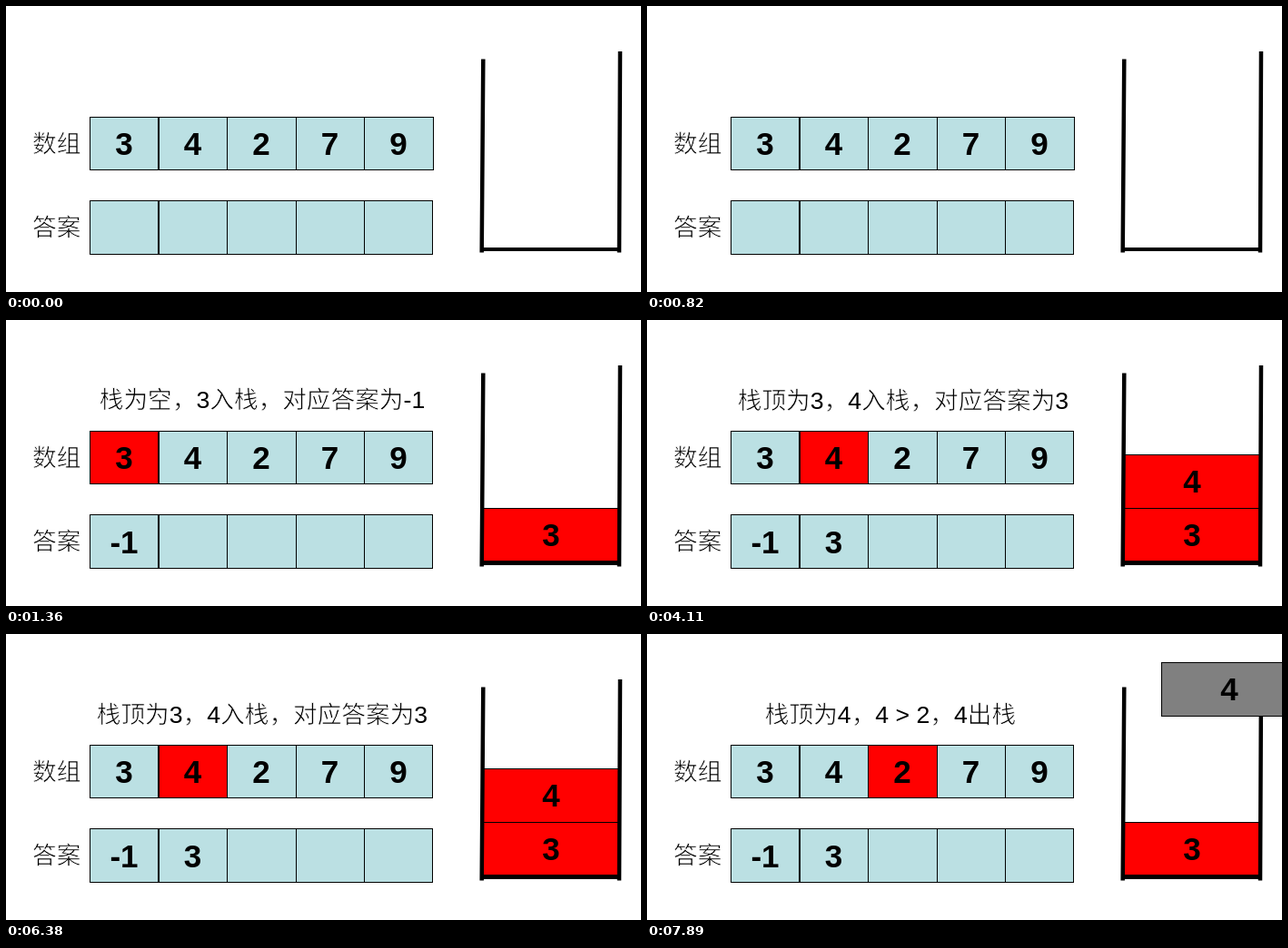
Animation of 699 by 315 pixels, one loop 8000 ms. Source, as an HTML page:

```html
<!DOCTYPE html>
<html lang="zh-CN">
<head>
<meta charset="utf-8">
<title>单调栈</title>
<style>
  html, body { margin: 0; width: 100%; height: 100%; overflow: hidden; background: #fff; }
  svg { display: block; width: 699px; height: 315px; }
  text { text-anchor: middle; font: bold 35px "Liberation Sans", Arial, sans-serif; }
  /* The white outline thins the strokes of the characters */
  .cjk { font: 300 26.67px "Liberation Sans", "Noto Sans CJK SC", "Noto Sans CJK", sans-serif; stroke: #fff; stroke-width: .7; }
  .cjk tspan { stroke: none; }
  .cell { fill: #bbe0e3; stroke: #000; }
  .hot { fill: #f00; stroke: #000; }
  .popped { fill: #808080; stroke: #000; }
  .wall { fill: none; stroke: #000; stroke-width: 4.5; }
  .floor { stroke: #000; stroke-width: 4; }
  .start, .push3, .push4, .pop4, .after3, .after4 { animation: 8s step-end infinite; }
  .start { animation-name: start; }
  .push3 { animation-name: push3; }
  .push4 { animation-name: push4; }
  .pop4 { animation-name: pop4; }
  .after3 { animation-name: after3; }
  .after4 { animation-name: after4; }
  /* Cuts at 1360, 4110 and 7890 ms */
  @keyframes start { 0% { opacity: 1 } 17%, 100% { opacity: 0 } }
  @keyframes push3 { 0% { opacity: 0 } 17% { opacity: 1 } 51.375%, 100% { opacity: 0 } }
  @keyframes push4 { 0% { opacity: 0 } 51.375% { opacity: 1 } 98.625%, 100% { opacity: 0 } }
  @keyframes pop4 { 0% { opacity: 0 } 98.625%, 100% { opacity: 1 } }
  @keyframes after3 { 0% { opacity: 0 } 17%, 100% { opacity: 1 } }
  @keyframes after4 { 0% { opacity: 0 } 51.375%, 100% { opacity: 1 } }
</style>
</head>
<body>
<svg viewBox="0 0 699 315">
  <defs>
    <path id="lines" d="M167.5 0V59M168.5 0V59M243.5 0V59M319.5 0V59M394.5 0V59" stroke="#000"/>
  </defs>

  <text class="cjk" x="55.7" y="161">数组</text>
  <text class="cjk" x="55.7" y="253">答案</text>
  <rect class="cell" x="92.5" y="122.5" width="377" height="58"/>
  <use href="#lines" y="122"/>
  <rect class="cell" x="92.5" y="214.5" width="377" height="59"/>
  <use href="#lines" y="214.5"/>

  <rect class="cell start" x="394.5" y="122.5" width="76" height="58"/>
  <rect class="hot push3" x="92.5" y="122.5" width="75" height="58"/>
  <rect class="hot push4" x="168.5" y="122.5" width="75" height="58"/>
  <rect class="hot pop4" x="243.5" y="122.5" width="76" height="58"/>

  <text x="130" y="163.5">3</text>
  <text x="205.5" y="163.5">4</text>
  <text x="281" y="163.5">2</text>
  <text x="356.5" y="163.5">7</text>
  <text x="432" y="163.5">9</text>
  <text class="after3" x="130" y="256.5">-1</text>
  <text class="after4" x="205.5" y="256.5">3</text>

  <text class="cjk push3" x="282" y="96.5">栈为空，<tspan>3</tspan>入栈，对应答案为<tspan>-1</tspan></text>
  <text class="cjk push4" x="282" y="97.5">栈顶为<tspan>3</tspan>，<tspan>4</tspan>入栈，对应答案为<tspan>3</tspan></text>
  <text class="cjk pop4" x="268" y="97.5">栈顶为<tspan>4</tspan>，<tspan>4 &gt; 2</tspan>，<tspan>4</tspan>出栈</text>

  <g class="push4">
    <rect class="hot" x="525.5" y="148.5" width="149" height="59"/>
    <text x="600" y="190">4</text>
  </g>
  <g class="after3">
    <rect class="hot" x="525.5" y="207.5" width="148" height="58"/>
    <text x="600" y="248.5">3</text>
  </g>
  <path class="wall" d="M525.3 58.5L523.7 271.5M676 50L675 271.5"/>
  <path class="floor" d="M523 268H676"/>
  <g class="pop4">
    <rect class="popped" x="566.5" y="31.5" width="149" height="59"/>
    <text x="641" y="73">4</text>
  </g>
</svg>
</body>
</html>
```
